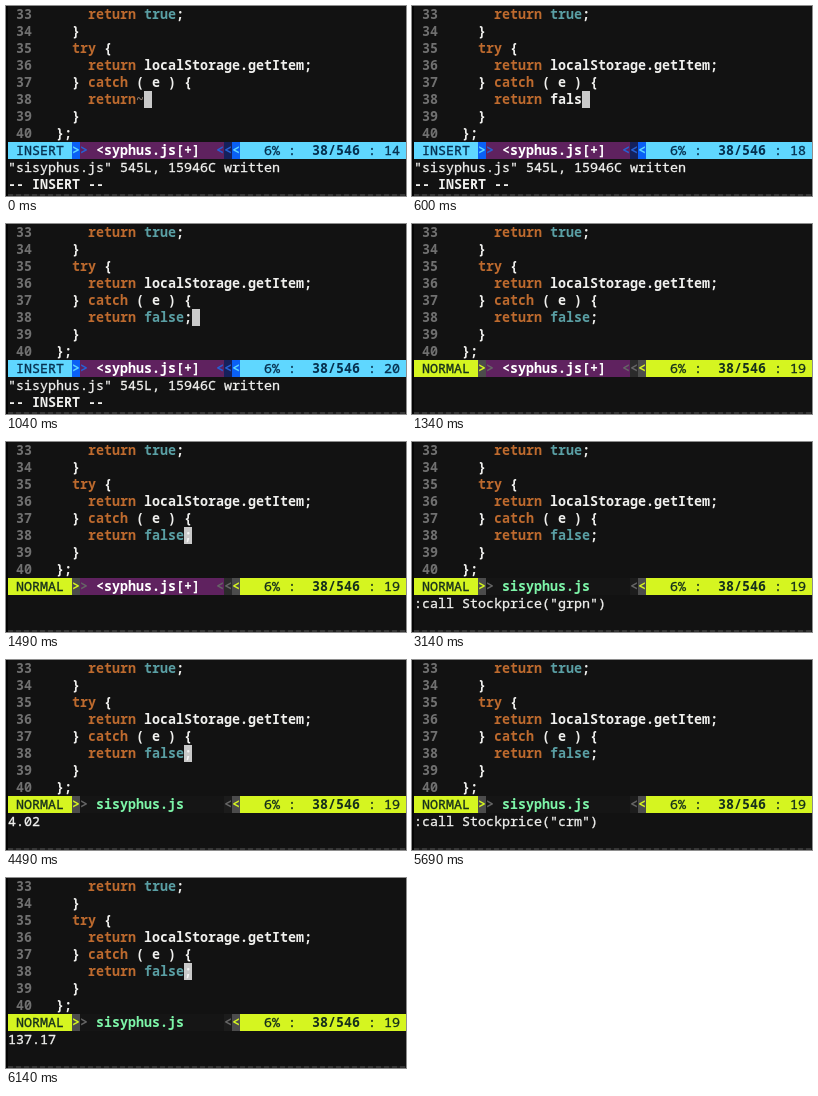
An HTML page for the animation above (8.24 s loop, 400 by 190 pixels).

```html
<!DOCTYPE html>
<html lang="en">
<head>
<meta charset="utf-8">
<title>Editor session</title>
<style>
html, body { margin: 0; width: 100%; height: 100%; overflow: hidden; background: #121212; }
#screen {
  position: relative; box-sizing: border-box; width: 400px; height: 190px; overflow: hidden;
  background: #121212; color: #f0f0ee; box-shadow: inset 2px 0 #050505;
  font: 700 13.333px/16px "Noto Sans Mono", "DejaVu Sans Mono", monospace;
}
#screen span { position: absolute; height: 17px; white-space: pre; }
/* Dim sliver of the window behind the terminal */
#screen::after {
  content: ""; position: absolute; inset: auto 0 0 2px; height: 2px;
  background: repeating-linear-gradient(90deg, #363636 0 5px, #1c1c1c 5px 8px);
}
.num { color: #707070; }
.key { color: #bd6a2e; }
.bool { color: #5a9fa4; }
.trail { color: #8a7a70; }
.cursor { background: #c9c9c9; color: #f4f4f4; }
.medium { font-weight: 400; -webkit-text-stroke: .3px; }
.bar { background: var(--main); color: var(--ink); }
.file { background: var(--file); color: var(--name); }
.edge { background: var(--edge); color: var(--main); }
.faint { background: var(--file); color: var(--faint); }
.inner { background: var(--inner); color: var(--faint); }
.insert { --main: #5fd7ff; --ink: #06304f; --edge: #0a60f5; --file: #5f225f; --inner: #15215c; --name: #fff; --faint: #2562d8; }
.normal { --main: #d5f520; --ink: #16301c; --edge: #4c4c4c; --file: #5f225f; --inner: #2b2b2b; --name: #fff; --faint: #666; }
.saved { --main: #d5f520; --ink: #16301c; --edge: #4c4c4c; --file: #151515; --inner: #1c1c1c; --name: #7df5a8; --faint: #666; }
</style>
</head>
<body>
<div id="screen"></div>
<script>
const LOOP = 8240, CELL = 8, ROW = 17, LEFT = 2;
const screen = document.getElementById("screen");

const inserting = { mode: "insert", message: '"sisyphus.js" 545L, 15946C written', footer: "-- INSERT --" };
const saved = { mode: "saved", value: "false;" };
const states = [
  { at: 0, ...inserting, value: "", cursor: 17 },
  { at: 300, ...inserting, value: "fa", cursor: 19 },
  { at: 600, ...inserting, value: "fals", cursor: 21 },
  { at: 900, ...inserting, value: "false", cursor: 22 },
  { at: 1040, ...inserting, value: "false;", cursor: 23 },
  { at: 1340, mode: "normal", value: "false;" },
  { at: 1490, mode: "normal", value: "false;", cursor: 22 },
  { at: 1790, ...saved, message: '"sisyphus.js" 546L, 15966C written', cursor: 22 },
  { at: 3140, ...saved, message: ':call Stockprice("grpn")' },
  { at: 4490, ...saved, message: "4.02", cursor: 22 },
  { at: 5690, ...saved, message: ':call Stockprice("crm")' },
  { at: 6140, ...saved, message: "137.17", cursor: 22 }
];

function put(row, col, text, style = "") {
  const run = document.createElement("span");
  run.className = style;
  run.textContent = text;
  run.style.left = LEFT + col * CELL + "px";
  run.style.top = row * ROW + "px";
  run.style.width = text.length * CELL + "px";
  screen.append(run);
}

function drawCode({ value, cursor }) {
  for (let row = 0; row < 8; row++) put(row, 1, String(33 + row), "num");
  put(0, 10, "return", "key");
  put(0, 17, "true", "bool");
  put(0, 21, ";");
  put(1, 8, "}");
  put(2, 8, "try", "key");
  put(2, 12, "{");
  put(3, 10, "return", "key");
  put(3, 17, "localStorage.getItem;");
  put(4, 8, "}");
  put(4, 10, "catch", "key");
  put(4, 16, "( e ) {");
  put(5, 10, "return", "key");
  if (!value) put(5, 16, "~", "trail");
  const complete = value.startsWith("false");
  put(5, 17, value.slice(0, 5), complete ? "bool" : "");
  put(5, 22, value.slice(5));
  if (cursor) put(5, cursor, value[cursor - 17] || " ", "cursor");
  put(6, 8, "}");
  put(7, 6, "};");
}

function drawStatus({ mode, cursor }) {
  const clean = mode === "saved";
  const column = mode === "insert" ? cursor - 3 : 19;
  put(8, 0, mode === "insert" ? " INSERT " : " NORMAL ", "bar medium");
  put(8, 8, ">", "edge");
  put(8, 9, ">", "faint");
  put(8, 10, (clean ? " sisyphus.js" : " <syphus.js[+]").padEnd(16), "file");
  put(8, 26, clean ? " " : "<", "faint");
  put(8, 27, "<", "inner");
  put(8, 28, "<", "edge");
  put(8, 29, "   6% :  ", "bar medium");
  put(8, 38, "38/546", "bar");
  put(8, 44, ` : ${column}   `, "bar medium");
}

function draw(state) {
  screen.className = state.mode;
  screen.replaceChildren();
  drawCode(state);
  drawStatus(state);
  put(9, 0, state.message || "", "medium");
  put(10, 0, state.footer || "");
}

let shown;
function tick(now) {
  const time = now % LOOP;
  const state = states.findLast(s => s.at <= time) || states[0];
  if (state !== shown) draw(shown = state);
  requestAnimationFrame(tick);
}
tick(performance.now());
</script>
</body>
</html>
```
